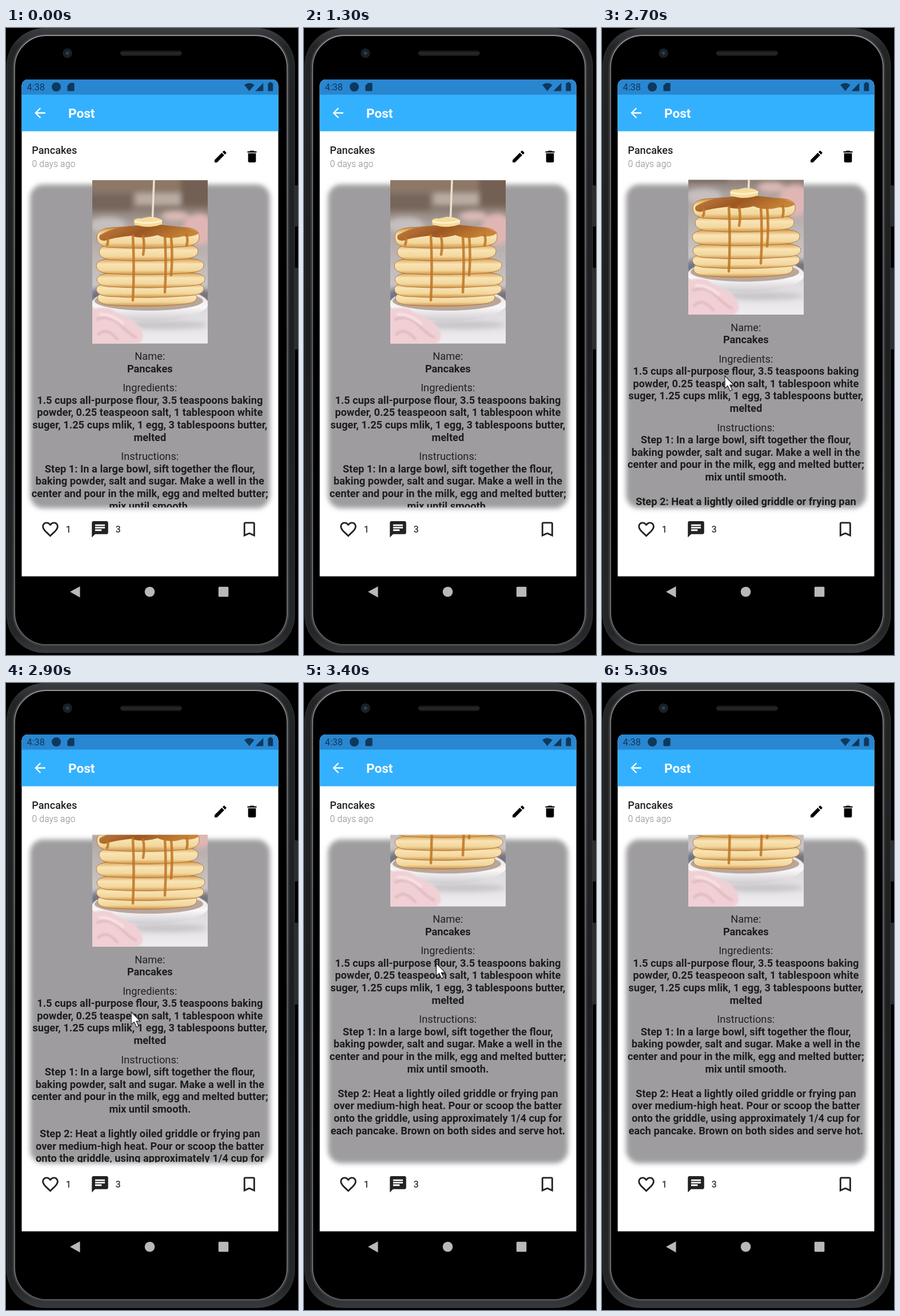
Write an HTML page that moves like this. It is 511 px wide and 1096 px high and loops after 5800 ms.

```html
<!DOCTYPE html>
<html lang="en">
<head>
<meta charset="utf-8">
<title>Recipe post</title>
<style>
  html, body { margin: 0; width: 100%; height: 100%; overflow: hidden; background: #000; }
  svg { display: block; width: 100%; height: 100%; }
  text { font-family: Roboto, "Liberation Sans", sans-serif; }
  .recipe text { font-size: 18.26px; fill: #222; text-anchor: middle; }
  .recipe .strong { font-weight: 700; fill: #1d1d1e; }
</style>
</head>
<body>
<svg viewBox="0 0 511 1096" preserveAspectRatio="none">
  <defs>
    <linearGradient id="rim" x2="0" y2="1">
      <stop offset="0" stop-color="#3d3e41"/><stop offset=".03" stop-color="#232426"/>
      <stop offset=".5" stop-color="#1d1e20"/>
      <stop offset=".97" stop-color="#252628"/><stop offset="1" stop-color="#38393c"/>
    </linearGradient>
    <linearGradient id="shine" x2="0" y2="1">
      <stop offset="0" stop-color="#929397"/><stop offset=".06" stop-color="#77787c"/>
      <stop offset=".5" stop-color="#5d5e62"/>
      <stop offset=".95" stop-color="#727377"/><stop offset="1" stop-color="#5a5b5f"/>
    </linearGradient>
    <linearGradient id="slot" x2="0" y2="1">
      <stop offset="0" stop-color="#0c0c0d"/><stop offset=".5" stop-color="#29292a"/><stop offset="1" stop-color="#161617"/>
    </linearGradient>
    <radialGradient id="lens">
      <stop offset="0" stop-color="#31506e"/><stop offset=".4" stop-color="#1c2c3e"/>
      <stop offset=".7" stop-color="#15181c"/><stop offset="1" stop-color="#2b2d30"/>
    </radialGradient>
    <linearGradient id="wall" x2="0" y2="1">
      <stop offset="0" stop-color="#8f7866"/><stop offset=".16" stop-color="#85756b"/>
      <stop offset=".26" stop-color="#aaa09c"/><stop offset=".62" stop-color="#c9c4c5"/>
      <stop offset=".78" stop-color="#dcdadc"/><stop offset="1" stop-color="#efedef"/>
    </linearGradient>
    <linearGradient id="cake" x2="0" y2="1">
      <stop offset="0" stop-color="#b8762f"/><stop offset=".18" stop-color="#e3b268"/>
      <stop offset=".4" stop-color="#f8e4b6"/><stop offset=".75" stop-color="#f3d79b"/><stop offset="1" stop-color="#cc9045"/>
    </linearGradient>
    <linearGradient id="syrup" x2="1" y2=".3">
      <stop offset="0" stop-color="#c58446"/><stop offset=".5" stop-color="#9c5722"/><stop offset="1" stop-color="#c98438"/>
    </linearGradient>
    <linearGradient id="dish" x2="0" y2="1">
      <stop offset="0" stop-color="#d9d5d7"/><stop offset=".6" stop-color="#f9f7f8"/><stop offset="1" stop-color="#cfccd0"/>
    </linearGradient>
    <filter id="edge" x="-10%" y="-10%" width="120%" height="120%"><feGaussianBlur stdDeviation="4"/></filter>
    <filter id="soft" x="-40%" y="-40%" width="180%" height="180%"><feGaussianBlur stdDeviation="5"/></filter>
    <filter id="mild" x="-20%" y="-20%" width="140%" height="140%"><feGaussianBlur stdDeviation="1.5"/></filter>
    <clipPath id="view"><rect x="28" y="265.5" width="448" height="572.5"/></clipPath>
    <clipPath id="print"><rect x="151" y="266" width="202" height="285.5"/></clipPath>
  </defs>

  <!-- phone body -->
  <rect width="511" height="1096"/>
  <g fill="#2b2c2e">
    <rect x="503" y="275" width="8" height="72" rx="2"/>
    <rect x="503" y="419" width="8" height="143" rx="2"/>
  </g>
  <rect x="1.5" y=".5" width="503.5" height="1091.5" rx="66" fill="url(#rim)" stroke="#3a3b3e"/>
  <rect x="14" y="12" width="479" height="1067" rx="57" stroke="#3a3b3e" stroke-width="5"/>
  <rect x="15" y="13" width="477" height="1065" rx="56" stroke="url(#shine)" stroke-width="1.8"/>
  <rect x="200" y="39" width="107.5" height="10" rx="5" fill="url(#slot)"/>
  <circle cx="107.5" cy="44" r="8" fill="url(#lens)"/>

  <!-- screen -->
  <path d="M27.5 958.5V100a10 10 0 0 1 10-10H466.5a10 10 0 0 1 10 10V958.5Z" fill="#fff"/>
  <path d="M27.5 117V100a10 10 0 0 1 10-10H466.5a10 10 0 0 1 10 10V117Z" fill="#2986d0"/>
  <rect x="27.5" y="116.5" width="449" height="64" fill="#33b1ff"/>
  <g fill="#0e385c">
    <text x="36.5" y="109" font-size="16.3">4:38</text>
    <circle cx="88" cy="103" r="8"/>
    <path d="M112 96h6.2a1.4 1.4 0 0 1 1.4 1.4v11.4a1.4 1.4 0 0 1-1.4 1.4h-9.4a1.4 1.4 0 0 1-1.4-1.4v-8Z"/>
    <path d="M425.8 110.2 417 99.6Q425.8 92.8 434.6 99.6Z"/>
    <path d="M436.5 110.2 450.3 96V110.2Z"/>
    <path d="M460.7 96.5v-1.7h4.2v1.7h2.3v13.7h-8.8V96.5Z"/>
  </g>
  <text x="109" y="157.3" font-size="22.6" font-weight="600" fill="#fff">Post</text>
  <text x="45.2" y="219.6" font-size="18" font-weight="500" letter-spacing=".1" fill="#202020">Pancakes</text>
  <text x="45.6" y="243" font-size="15.6" font-weight="300" letter-spacing=".15" fill="#858585">0 days ago</text>
  <g font-size="15.8" font-weight="500" fill="#333"><text x="104.8" y="881.9">1</text><text x="191.7" y="881.9">3</text></g>
  <g id="icons" fill-rule="evenodd"></g>

  <!-- scrolling card -->
  <rect x="42" y="273.5" width="420" height="566" rx="23" fill="#9e9c9f" filter="url(#edge)"/>
  <g clip-path="url(#view)">
    <g id="scroll">
      <g clip-path="url(#print)">
        <rect x="151" y="266" width="202" height="286" fill="url(#wall)"/>
        <g filter="url(#soft)">
          <rect x="145" y="290" width="75" height="28" fill="#76655a"/>
          <rect x="226" y="288" width="84" height="22" fill="#b9aca3"/>
          <rect x="306" y="262" width="54" height="48" fill="#735f52"/>
          <ellipse cx="178" cy="345" rx="32" ry="14" fill="#c5bfc0"/>
          <ellipse cx="338" cy="352" rx="28" ry="28" fill="#e0b6b5"/>
          <ellipse cx="296" cy="329" rx="24" ry="9" fill="#dcbab6"/>
          <ellipse cx="160" cy="469" rx="16" ry="14" fill="#6f7485"/>
          <ellipse cx="348" cy="468" rx="16" ry="12" fill="#77737b"/>
          <ellipse cx="275" cy="519" rx="78" ry="7" fill="#c6c4c8"/>
        </g>
        <ellipse cx="252" cy="482" rx="102" ry="30" fill="url(#dish)"/>
        <ellipse cx="250" cy="477" rx="95" ry="17" fill="#b9a69a"/>
        <g id="stack"></g>
        <path d="M164 362Q190 347 222 346Q255 341 290 346Q326 350 338 358Q330 366 310 364Q286 371 265 362Q235 370 220 363Q190 366 172 372Q160 371 164 362Z" fill="url(#syrup)"/>
        <path id="drips" fill="none" stroke="#bf7423" stroke-width="4.5" stroke-opacity=".85" stroke-linecap="round"/>
        <path d="M224 337Q226 332 236 333L250 330Q268 331 273 336V343Q258 349 240 347L225 344Z" fill="#f5dc9c"/>
        <path d="M225 338Q248 344 273 337" fill="none" stroke="#fff2c9" stroke-width="3"/>
        <path d="M259 266 256.5 332" stroke="#eee0ce" stroke-width="3.5"/>
        <g filter="url(#mild)">
          <path d="M148 492Q168 486 184 491Q198 501 213 507Q236 517 239 535Q242 549 222 556H148Z" fill="#f0d0d5"/>
          <path d="M158 510Q180 499 200 519T229 541M160 537Q175 520 196 545" fill="none" stroke="#e3bcc3" stroke-width="5"/>
          <path d="M163 501Q184 499 206 518" fill="none" stroke="#f8e3e6" stroke-width="5"/>
        </g>
      </g>
      <g id="recipe" class="recipe"></g>
    </g>
  </g>

  <!-- navigation keys -->
  <g fill="#b9b9b9">
    <path d="M112 985.5 129.5 976V995.5Z"/>
    <circle cx="251.5" cy="985.5" r="8.8"/>
    <rect x="371.8" y="976.8" width="17.5" height="17.5" rx="1.5"/>
  </g>
  <path id="cursor" d="M0 0V22L5 17.5 9 26.5 12.8 24.8 8.8 16.2H15.5Z" fill="#fff" stroke="#222" stroke-width="1.2"/>
</svg>
<script>
const LOOP = 5800, STEP = 100;
const byId = id => document.getElementById(id);

function add(parent, name, attrs, content = '') {
  const el = document.createElementNS('http://www.w3.org/2000/svg', name);
  for (const key in attrs) el.setAttribute(key, attrs[key]);
  el.textContent = content;
  byId(parent).appendChild(el);
}

// Icons live on a 24-unit grid and are placed by their centre.
function icon(x, y, scale, fill, d) {
  add('icons', 'path', { d, fill, transform: `translate(${x} ${y}) scale(${scale}) translate(-12 -12)` });
}
icon(59.5, 148.5, 1.16, '#fff', 'M20 11H7.83l5.59-5.59L12 4l-8 8 8 8 1.41-1.41L7.83 13H20v-2z');
icon(375.3, 224.7, 1.141, '#000', 'M3 17.25V21h3.75L17.81 9.94l-3.75-3.75L3 17.25zM20.71 7.04c.39-.39.39-1.02 0-1.41l-2.34-2.34c-.39-.39-1.02-.39-1.41 0l-1.83 1.83 3.75 3.75 1.83-1.83z');
icon(430.5, 224.7, 1.141, '#000', 'M6 19c0 1.1.9 2 2 2h8c1.1 0 2-.9 2-2V7H6v12zM19 4h-3.5l-1-1h-5l-1 1H5v2h14V4z');
icon(77.5, 876.3, 1.426, '#222', 'M16.5 3c-1.74 0-3.41.81-4.5 2.09C10.91 3.81 9.24 3 7.5 3 4.42 3 2 5.42 2 8.5c0 3.78 3.4 6.86 8.55 11.54L12 21.35l1.45-1.32C18.6 15.36 22 12.28 22 8.5 22 5.42 19.58 3 16.5 3zm-4.4 15.55l-.1.1-.1-.1C7.14 14.24 4 11.39 4 8.5 4 6.5 5.5 5 7.5 5c1.54 0 3.04.99 3.57 2.36h1.87C13.46 5.99 14.96 5 16.5 5c2 0 3.5 1.5 3.5 3.5 0 2.89-3.14 5.74-7.9 10.05z');
icon(164.5, 876.3, 1.426, '#222', 'M20 2H4c-1.1 0-1.99.9-1.99 2L2 22l4-4h14c1.1 0 2-.9 2-2V4c0-1.1-.9-2-2-2zM6 9h12v2H6V9zm8 5H6v-2h8v2zm4-6H6V6h12v2z');
icon(425.8, 876.3, 1.426, '#222', 'M17 3H7c-1.1 0-1.99.9-1.99 2L5 21l7-3 7 3V5c0-1.1-.9-2-2-2zm0 15l-5-2.18L7 18V5h10v13z');

// Pancakes from the bottom up: left, right, top, height.
const cakes = [
  [160, 334, 459, 25], [158, 346, 444, 25], [159, 348, 427, 25],
  [158, 346, 402, 27], [163, 336, 377, 28], [159, 338, 348, 35],
];
for (const [left, right, top, h] of cakes) {
  const end = top + h, mid = top + h / 2;
  add('stack', 'path', {
    d: `M${left} ${mid}Q${left} ${top + 3} ${left + 24} ${top + 1}Q250 ${top - 4} ${right - 20} ${top + 1}` +
       `Q${right + 2} ${top + 4} ${right} ${mid}Q${right} ${end - 3} ${right - 26} ${end - 1}` +
       `Q250 ${end + 5} ${left + 18} ${end}Q${left} ${end - 3} ${left} ${mid}Z`,
    fill: 'url(#cake)', stroke: '#a9682c', 'stroke-width': .8,
  });
}
const drips = [[177, 366, 379], [222, 362, 476], [240, 364, 396], [278, 362, 462], [289, 364, 432], [316, 361, 380]];
byId('drips').setAttribute('d', drips.map(([x, y, end]) => `M${x} ${y}Q${x + 3} ${(y + end) / 2} ${x} ${end}`).join(''));

const PITCH = 21.6;
function paragraph(label, y, lines) {
  add('recipe', 'text', { x: 251.8, y }, label);
  lines.forEach((line, i) =>
    add('recipe', 'text', { x: 251.8, y: y + PITCH * (i + 1), class: 'strong' }, line));
}
paragraph('Name:', 580.3, ['Pancakes']);
paragraph('Ingredients:', 635.2, [
  '1.5 cups all-purpose flour, 3.5 teaspoons baking',
  'powder, 0.25 teaspeoon salt, 1 tablespoon white',
  'suger, 1.25 cups mlik, 1 egg, 3 tablespoons butter,',
  'melted',
]);
paragraph('Instructions:', 755.2, [
  'Step 1: In a large bowl, sift together the flour,',
  'baking powder, salt and sugar. Make a well in the',
  'center and pour in the milk, egg and melted butter;',
  'mix until smooth.',
  '',
  'Step 2: Heat a lightly oiled griddle or frying pan',
  'over medium-high heat. Pour or scoop the batter',
  'onto the griddle, using approximately 1/4 cup for',
  'each pancake. Brown on both sides and serve hot.',
]);

// Each key is [time, ...values]; values between keys are linear.
function sample(keys, t) {
  const next = keys.findIndex(key => key[0] > t);
  if (next === 0) return keys[0].slice(1);
  if (next < 0) return keys[keys.length - 1].slice(1);
  const a = keys[next - 1], b = keys[next];
  const k = (t - a[0]) / (b[0] - a[0]);
  return a.slice(1).map((v, i) => v + (b[i + 1] - v) * k);
}
const scrollKeys = [[2400, 0], [2500, 8], [2700, 50.6], [3100, 130.7], [3300, 161]];
const cursorKeys = [
  [1900, 40, 655], [2300, 206, 678], [2400, 206, 678], [2500, 209, 658],
  [2700, 215, 608], [3100, 223.5, 542], [3400, 231.5, 490], [3600, 234, 476], [3700, 160, 510],
];

function draw(now) {
  const t = Math.floor(now % LOOP / STEP) * STEP;
  const [offset] = sample(scrollKeys, t);
  const [x, y] = sample(cursorKeys, t);
  byId('scroll').setAttribute('transform', `translate(0 ${-offset})`);
  byId('cursor').setAttribute('transform', `translate(${x} ${y})`);
  byId('cursor').setAttribute('visibility', t >= 1900 && t < 3800 ? 'visible' : 'hidden');
}

const start = performance.now();
function tick() {
  draw(performance.now() - start);
  requestAnimationFrame(tick);
}
tick();
</script>
</body>
</html>
```
